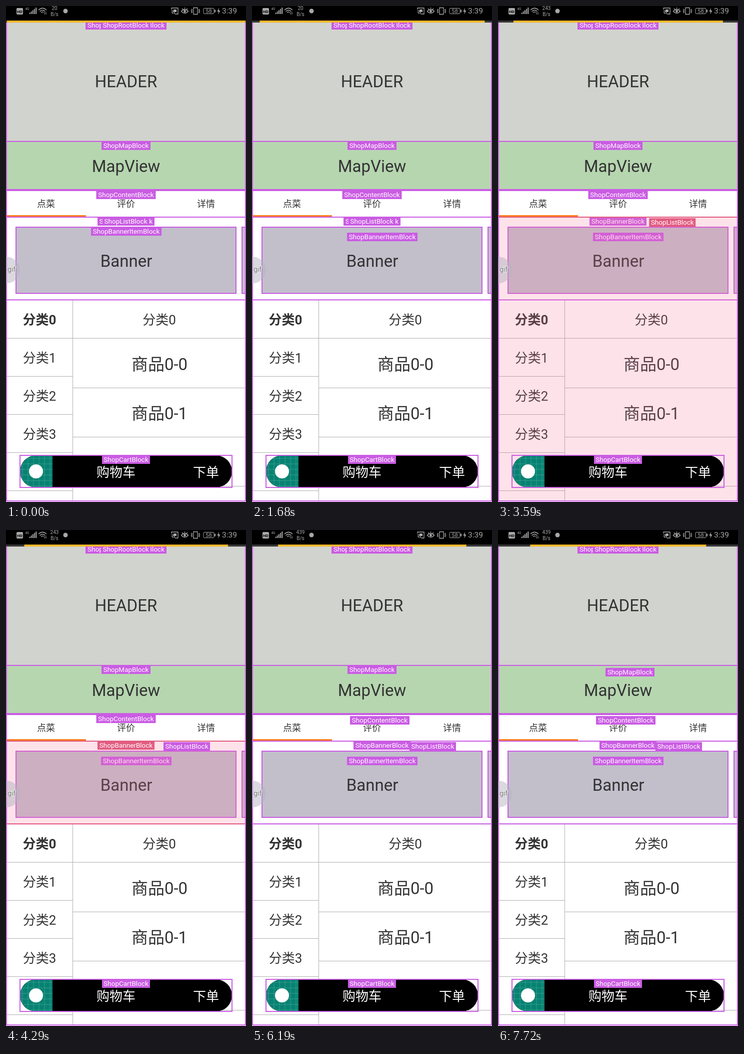
Write an HTML page that moves like this. It is 480 px wide and 989 px high and loops after 8000 ms.

```html
<!DOCTYPE html>
<html lang="zh-CN">
<head>
<meta charset="utf-8">
<title>Block inspector</title>
<style>
html, body { margin: 0; width: 100%; height: 100%; overflow: hidden; background: #fff; }
svg { display: block; width: 100%; height: 100%; }
text { font-family: Roboto, "Noto Sans CJK SC DemiLight", "Noto Sans CJK SC", "Noto Sans CJK", sans-serif; }
</style>
</head>
<body>
<svg id="stage" viewBox="0 0 480 989" preserveAspectRatio="none"></svg>
<script>
const LOOP = 8000;
const PURPLE = '#ca5ce3', RED = '#e25c80', INK = '#333', LINE = '#b0b0b0', ICON = '#a8a8a8';
const BANNER = '#c2bfcb';

// area: highlighted box; path: [time, x, y] of the label; hold: pressed interval
const blocks = {
  item: { name: 'ShopBannerItemBlock', w: 141, area: [20, 441, 440, 132], hold: [850, 1660],
    path: [[1050, 170, 441], [1600, 190, 452]] },
  banner: { name: 'ShopBannerBlock', w: 114, area: [1, 421, 478, 165], hold: [4190, 4950],
    path: [[4300, 183, 421], [4810, 203, 421]] },
  list: { name: 'ShopListBlock', w: 93, area: [1, 421, 478, 566], hold: [2220, 3880],
    path: [[2400, 193, 421], [2830, 241, 424], [3750, 315, 423]] },
  content: { name: 'ShopContentBlock', w: 119, area: [1, 368, 478, 619], hold: [5410, 6190],
    path: [[5500, 180.5, 368], [6050, 196, 371]] },
  map: { name: 'ShopMapBlock', w: 98, area: [1, 270, 478, 96], hold: [6540, 7120],
    path: [[6620, 191, 270], [7060, 215, 275]] }
};

const rect = (x, y, w, h, fill, more = '') =>
  `<rect x="${x}" y="${y}" width="${w}" height="${h}" fill="${fill}" ${more}/>`;
const frame = (x, y, w, h) => rect(x, y, w, h, 'none', `stroke="${PURPLE}" stroke-width="2"`);
const text = (x, y, size, str, fill = INK, more = '') =>
  `<text x="${x}" y="${y}" font-size="${size}" fill="${fill}" text-anchor="middle" ${more}>${str}</text>`;
const stroke = (d, color = ICON, width = 1.3) =>
  `<path d="${d}" fill="none" stroke="${color}" stroke-width="${width}"/>`;
const tag = (x, y, w, name, id = '') =>
  `<g ${id && `id="${id}"`} transform="translate(${x} ${y})">${rect(0, 0, w, 17, PURPLE)}` +
  text(w / 2, 13, 13.5, name, '#fff') + '</g>';
const shade = id => {
  const [x, y, w, h] = blocks[id].area;
  return rect(x, y, w, h, 'rgba(242,110,150,.2)',
    `id="${id}-shade" stroke="${RED}" stroke-width="2" display="none"`);
};
const layer = id => shade(id) + tag(0, 0, blocks[id].w, blocks[id].name, id);

function header() {
  return rect(0, 33, 480, 236, '#d1d3ce') + text(240, 162, 33, 'HEADER') +
    rect(0, 270, 480, 97, '#b6d6b0') + text(240, 331, 33, 'MapView') +
    rect(0, 269, 480, 2, PURPLE) + rect(0, 365, 480, 2, PURPLE) + layer('map');
}

function content() {
  let s = rect(0, 367, 480, 622, '#fff');
  ['点菜', '评价', '详情'].forEach((name, i) => s += text(80 + 160 * i, 401, 18, name));
  s += rect(0, 417, 160, 3, '#fb7d20');
  s += rect(0, 367, 480, 2, PURPLE) + rect(0, 420, 480, 2, PURPLE);

  s += rect(20, 441, 440, 132, BANNER) + rect(472, 441, 8, 132, BANNER);
  s += frame(20, 441, 440, 132) + frame(472, 441, 30, 132);
  s += text(240.5, 520, 33, 'Banner');

  s += rect(133, 587, 1, 400, LINE);
  for (let i = 0; i < 5; i++) {
    s += rect(2, 662 + 76 * i, 131, 1, LINE);
    if (i < 4) s += text(67, 635 + 76 * i, 26, '分类' + i, INK, i ? '' : 'font-weight="700"');
  }
  s += text(306.5, 635, 26, '分类0');
  [662, 761, 859, 957].forEach(y => s += rect(134, y, 344, 1, LINE));
  for (let i = 0; i < 2; i++) s += text(307, 725.5 + 98 * i, 33, '商品0-' + i);
  s += rect(0, 585, 480, 2, PURPLE);
  return s + ['item', 'banner', 'list', 'content'].map(layer).join('');
}

function cart() {
  let grid = '';
  for (let i = 0; i < 6; i++) grid += `M${33 + 11 * i} 896V960M27 ${902 + 11 * i}H93`;
  return '<clipPath id="pill"><rect x="28" y="896" width="424" height="64" rx="32"/></clipPath>' +
    '<g clip-path="url(#pill)">' + rect(28, 896, 424, 64, '#000') + rect(27, 896, 66, 64, '#078272') +
    stroke(grid, '#4aa698', 0.7) + '<circle cx="60" cy="928" r="14" fill="#fff"/></g>' +
    text(220, 939, 26, '购物车', '#fff') + text(400, 939, 26, '下单', '#fff') +
    frame(28, 896, 424, 64) + tag(192, 896, 96, 'ShopCartBlock');
}

function rootFrame() {
  return rect(0, 33, 2, 955, PURPLE) + rect(478, 33, 2, 955, PURPLE) + rect(0, 986, 480, 2, PURPLE) +
    rect(159, 30, 162, 17, PURPLE) +
    text(163, 43, 13.5, 'Shop', '#fff', 'style="text-anchor:start"') +
    text(317, 43, 13.5, 'Block', '#fff', 'style="text-anchor:end"') +
    tag(190, 30, 99, 'ShopRootBlock');
}

function badge() {
  return '<circle cx="1" cy="526.5" r="26.5" fill="rgba(180,180,192,.5)"/>' +
    text(11, 530, 14, 'gif', '#777', 'stroke="#eee" stroke-width="2" paint-order="stroke"');
}

function statusBar() {
  let s = rect(0, 0, 480, 30, '#000');
  s += rect(21, 4, 13, 13, ICON, 'rx="2"') + text(27.5, 13.5, 8, 'HD', '#000', 'font-weight="700"');
  s += text(42.5, 8, 6.5, '4G', ICON);
  for (let i = 0; i < 5; i++) s += rect(46.5 + 3.2 * i, 13.5 - 2.6 * i, 2, 2.5 + 2.6 * i, ICON);
  s += stroke('M65 8Q73 .5 81 8M67.5 11Q73 5.5 78.5 11M70 13.5Q73 10.5 75 13') +
    stroke('M77 12V17M80 12V17', ICON, 1);
  s += text(97, 8, 10, '', ICON, 'id="rate"') + text(97, 20, 10, 'B/s', ICON);
  s += `<circle cx="119" cy="10" r="4.5" fill="${ICON}"/>`;
  s += stroke('M331 7V4H344V16H338M331 9.5Q337 9.5 337 16M331 12.5Q334 12.5 334 16') +
    rect(335, 7, 6, 5, ICON);
  s += stroke('M350.5 10.5Q357.5 3 364.5 10.5Q357.5 18 350.5 10.5ZM352 5L354 7M357.5 3V5.5M363 5L361 7') +
    `<circle cx="357.5" cy="10.5" r="2.4" fill="${ICON}"/>`;
  s += stroke('M375 3.5H383V16.5H375ZM370.5 6L372.5 8L370.5 10L372.5 12L370.5 14' +
    'M387.5 6L385.5 8L387.5 10L385.5 12L387.5 14');
  s += rect(395, 4.5, 21, 11, 'none', `rx="2" stroke="${ICON}"`) + rect(417, 7.5, 2, 5, ICON) +
    text(405.5, 14, 11, '58', ICON);
  s += `<path d="M426 3.5L422.5 11H425.2L424.5 17L428.3 9H425.5Z" fill="${ICON}"/>`;
  s += text(447, 15.3, 15.5, '3:39', ICON);
  return s + rect(0, 29, 480, 4, '#383838') + rect(0, 29, 480, 4, '#fdb92a', 'id="bar"');
}

const stage = document.getElementById('stage');
stage.innerHTML = header() + content() + cart() + rootFrame() + badge() + statusBar();

const get = id => document.getElementById(id);
const bar = get('bar'), rate = get('rate');
const parts = Object.entries(blocks).map(([id, b]) =>
  ({ ...b, label: get(id), back: get(id).firstChild, shade: get(id + '-shade') }));

function along(path, t) {
  if (t <= path[0][0]) return path[0].slice(1);
  for (let i = 1; i < path.length; i++) {
    const [t0, x0, y0] = path[i - 1], [t1, x1, y1] = path[i];
    if (t < t1) {
      const k = (t - t0) / (t1 - t0);
      return [x0 + (x1 - x0) * k, y0 + (y1 - y0) * k];
    }
  }
  return path[path.length - 1].slice(1);
}

function draw(t) {
  const edge = 1.8 + t * 0.0081;
  bar.setAttribute('x', edge);
  bar.setAttribute('width', 480.7 - 2 * edge);
  rate.textContent = t < 2500 ? '20' : t < 5800 ? '243' : '439';
  for (const p of parts) {
    const held = t >= p.hold[0] && t < p.hold[1];
    p.label.setAttribute('transform', `translate(${along(p.path, t).join(' ')})`);
    p.back.setAttribute('fill', held ? RED : PURPLE);
    p.shade.setAttribute('display', held ? 'inline' : 'none');
  }
}

const start = performance.now();
function tick() {
  draw((performance.now() - start) % LOOP);
  requestAnimationFrame(tick);
}
tick();
</script>
</body>
</html>
```
